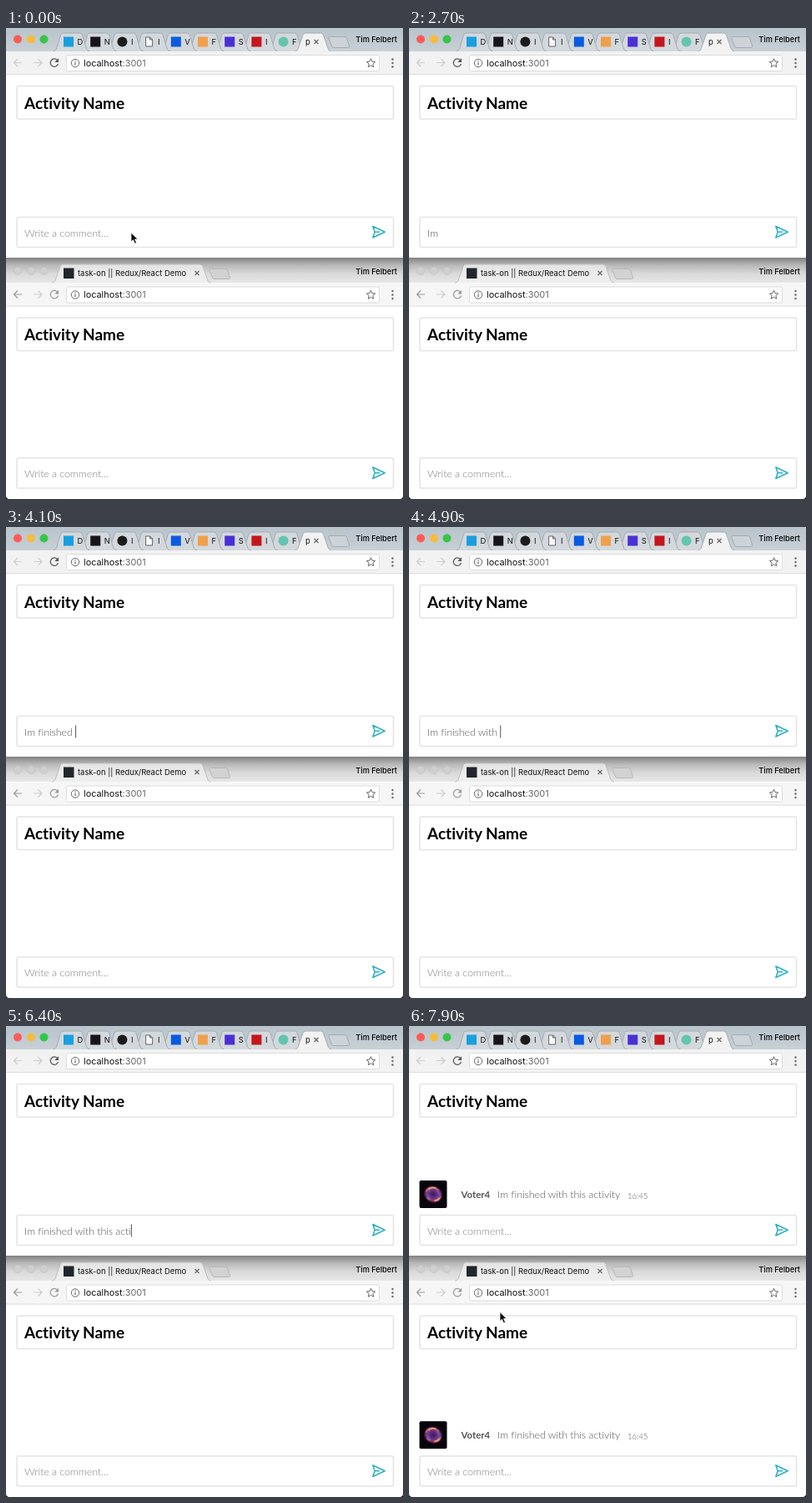
Animation of 476 by 564 pixels, one loop 8000 ms. Source, as an HTML page:

```html
<!DOCTYPE html>
<html lang="en">
<head>
<meta charset="utf-8">
<title>Live comments</title>
<style>
html, body { margin: 0; width: 100%; height: 100%; overflow: hidden; background: #fff; }
svg { display: block; width: 476px; height: 564px; }
text { white-space: pre; }
.ui { font-family: Inter, sans-serif; fill: #111; }
.name { font-size: 9.200px; font-weight: 500; text-anchor: end; fill: #000; }
.lato { font-family: Lato, sans-serif; font-size: 12.600px; font-weight: 300; letter-spacing: -.14px; fill: #555; }
.title { font-size: 19px; font-weight: 700; letter-spacing: 0; font-variant-ligatures: none; fill: #000; }
.user { font-size: 11.400px; font-weight: 700; letter-spacing: 0; fill: #555; }
.time { font-size: 9.500px; letter-spacing: 0; }
.hint { fill: #808080; }
.box { fill: #fff; stroke: #e4e4e4; stroke-width: 1.5; }
.line { fill: none; stroke: #666; stroke-width: 1.2; }
.active { --bar: #f2f2f2; --back: #cdcdcd; --reload: #555; }
.inactive { --bar: #f6f6f6; --back: #999; --reload: #999; }
</style>
</head>
<body>
<svg viewBox="0 0 476 564">
  <defs>
    <linearGradient id="strip" x2="0" y2="1">
      <stop stop-color="#b8c3cb"/><stop offset="1" stop-color="#c8d0d6"/>
    </linearGradient>
    <linearGradient id="shade" x2="0" y2="1">
      <stop stop-color="#828282"/><stop offset=".3" stop-color="#b8b8b8"/>
      <stop offset=".65" stop-color="#dadada"/><stop offset="1" stop-color="#e6e6e6"/>
    </linearGradient>
    <radialGradient id="nebula">
      <stop stop-color="#3d1c4c"/><stop offset=".45" stop-color="#6a3086"/>
      <stop offset=".7" stop-color="#8c3f78"/><stop offset="1" stop-color="#07040c"/>
    </radialGradient>

    <g id="page">
      <path style="fill:var(--bar)" d="M0 28H476V56H0Z"/>
      <path stroke="#dedede" d="M0 55.5H476"/>
      <g class="line">
        <path style="stroke:var(--back)" d="M19 41.5H9.500M14 37l-4.500 4.500 4.500 4.500"/>
        <path stroke="#cdcdcd" d="M33 41.500H43M38.500 37l4.500 4.500-4.500 4.500"/>
        <path style="stroke:var(--reload)" d="M61.500 38.500a4.700 4.700 0 1 0 1 4.500"/>
        <rect x="72.500" y="32.500" width="375" height="19" rx="2" fill="#fff" stroke="#dcdcdc" stroke-width="1"/>
        <circle cx="83" cy="42" r="4.700" stroke-width="1"/>
        <path d="M83 41.300v3.300M83 39v1.200"/>
        <path stroke-width="1" d="M437.500 36.700l1.500 3.400 3.700.4-2.800 2.500.8 3.700-3.200-1.900-3.200 1.900.8-3.700-2.800-2.500 3.700-.4z"/>
      </g>
      <path style="fill:var(--reload)" d="M63 36.300v4.700h-4.700z"/>
      <g fill="#666"><circle cx="463.500" cy="37.500" r="1.200"/><circle cx="463.500" cy="42" r="1.200"/><circle cx="463.500" cy="46.500" r="1.200"/></g>
      <text class="ui" x="93" y="45.700" font-size="10.900">localhost<tspan fill="#666">:3001</tspan></text>
      <rect class="box" x="13" y="69.500" width="451.500" height="39.500" rx="2"/>
      <text class="lato title" x="22" y="96.700">Activity Name</text>
    </g>

    <g id="field">
      <rect class="box" x="13" y="226.500" width="451.500" height="36" rx="2"/>
      <path fill="none" stroke="#2db0c4" stroke-width="1.600" stroke-linejoin="round" d="M439.800 237.500l14.400 6.700-14.400 6.700 2.400-6.700zM442.200 244.200h6"/>
    </g>

    <g id="comment">
      <rect x="12.500" y="185" width="33" height="33" rx="2" fill="#07040c"/>
      <g transform="translate(29 201.500) rotate(25)" fill="none" stroke-width="2">
        <ellipse rx="12" ry="10.500" fill="url(#nebula)"/>
        <ellipse rx="9" ry="7.500" stroke="#d0568c" stroke-dasharray="9 5 4 7"/>
        <ellipse rx="7" ry="6" stroke="#5a58c0" stroke-dasharray="3 8 6 4"/>
        <path stroke="#e59a6a" d="M-8-3q3-5 8-5M5 6q3-2 4-5"/>
      </g>
      <text class="lato user" x="62.500" y="205.700">Voter4</text>
      <text class="lato" x="106" y="206">Im finished with this activity</text>
      <text class="lato time" x="262" y="207">16:45</text>
    </g>

    <text id="hint" class="lato hint" x="22" y="249.500">Write a comment...</text>
  </defs>

  <path fill="url(#strip)" d="M0 0H476V28H0Z"/>
  <circle cx="14" cy="13.500" r="5" fill="#fc5b57"/>
  <circle cx="30" cy="13.500" r="5" fill="#f6bc3c"/>
  <circle cx="45.500" cy="13.500" r="5" fill="#34c648"/>
  <g id="tabs"></g>
  <path fill="#cdd3d7" stroke="#a4acb2" d="M387.500 10.500H406q2 0 2.500 1.500l3 9q.5 2.500-1 2.500H393q-2 0-2.500-1.500l-3.500-9.500q-.5-2 .5-2z"/>
  <path fill="#f2f2f2" stroke="#a4acb2" d="M346 28.500q3-1 4-3l6-17q1-2.500 3-2.500h18.500q2 0 3 2.500l6 17q1 2 4 3"/>
  <text class="ui" x="359" y="20" font-size="9.400">p</text>
  <path class="line" stroke-width="1.100" d="M369.500 14l5 5m0-5l-5 5"/>
  <text class="ui name" x="469" y="17">Tim Felbert</text>
  <use href="#page" class="active"/>
  <use href="#field"/>

  <path fill="url(#shade)" d="M0 275H476V305H0Z"/>
  <path fill="#fff" d="M0 270H476V272q0 3-3 3H3q-3 0-3-3z"/>
  <g fill="#cfcfcf" stroke="#c2c2c2" stroke-width=".6"><circle cx="14" cy="291" r="4.700"/><circle cx="30" cy="291" r="4.700"/><circle cx="45.500" cy="291" r="4.700"/></g>
  <path fill="#f2f2f2" stroke="#bdbdbd" d="M55 305.500q3-1 4-3l6-17q1-2.500 3-2.500h165q2 0 3 2.500l6 17q1 2 4 3" fill-opacity=".75"/>
  <path fill="#d2d2d2" stroke="#b8b8b8" d="M244.500 288.500H263q2 0 2.500 1.500l3 8.500q.5 2-1 2H250q-2 0-2.500-1.500l-3.500-8.500q-.5-2 .5-2z"/>
  <rect x="69" y="287.500" width="12.500" height="12.500" fill="#20262b"/>
  <text class="ui" x="86" y="297" font-size="9.400">task-on || Redux/React Demo</text>
  <path class="line" stroke-width="1.100" d="M226.500 291l5 5m0-5l-5 5"/>
  <text class="ui name" x="469" y="294.500">Tim Felbert</text>
  <use href="#page" y="277.500" class="inactive"/>
  <use href="#field" y="288.500"/>
  <use href="#hint" y="288.500"/>
  <path d="M0 560v4h4q-4 0-4-4zM476 560v4h-4q4 0 4-4z"/>

  <use id="hintTop" href="#hint"/>
  <text id="typed" class="lato" x="22" y="249.500"></text>
  <path id="caret" stroke="#555" d="M0 237.500v15"/>
  <use id="postTop" href="#comment"/>
  <use id="postBottom" href="#comment" y="288.300"/>
  <path id="beam" fill="none" stroke="#222" stroke-width="1.200" d="M147 240.500q3 0 3 2v7q0 2-3 2M153 240.500q-3 0-3 2v7q0 2 3 2M148.500 247.500h3"/>
  <path id="arrow" stroke="#fff" stroke-width=".8" d="M0 0v11l2.500-2.300 2 4.500 2-.9-2-4.300H8z"/>
</svg>
<script>
const $ = id => document.getElementById(id);
const show = (id, on) => $(id).setAttribute('visibility', on ? 'visible' : 'hidden');

// Background tabs: icon colour, round or square, first letter of the title
const tabs = [
  ['#199fe0', 0, 'D'], ['#17151a', 0, 'N'], ['#1b1b1b', 1, 'I'], ['', 0, 'I'], ['#0a5be0', 0, 'V'],
  ['#f0a04b', 0, 'F'], ['#4b2fd6', 0, 'S'], ['#c4161c', 0, 'I'], ['#63c5ae', 1, 'F']
];
$('tabs').innerHTML = tabs.map(([color, round, letter], i) => {
  const icon = !color
    ? '<path fill="#f7f7f7" stroke="#666" d="M14.500 11h5l3 3v8h-8zM19.500 11v3h3"/>'
    : round ? `<circle cx="18.500" cy="16.500" r="6" fill="${color}"/>`
    : `<rect x="12.500" y="10.500" width="12" height="12" fill="${color}"/>`;
  return `<g transform="translate(${56.5 + i * 32.2})">
    <path fill="#d3d8dc" stroke="#a4acb2" d="M0 28q3-1 4-3l5-16.500q1-2.500 3-2.500h20q2 0 3 2.500l5 16.500q1 2 4 3"/>
    ${icon}<svg x="29" style="width:3.500px;height:28px"><text class="ui" y="20" font-size="9.400">${letter}</text></svg></g>`;
}).reverse().join('');

const message = 'Im finished with this activity';
// Key times in tenths of a second
const keys = [16, 18, 21, 30, 31, 32, 35, 36, 36, 37, 38, 40, 43, 44, 46, 47, 49, 51,
  53, 54, 55, 57, 58, 60, 63, 64, 68, 69, 71, 72];
const sent = 7800;

function draw(now) {
  const t = now % 8000;
  const count = t < sent ? keys.filter(k => k * 100 <= t).length : 0;
  const typed = $('typed');
  typed.textContent = message.slice(0, count);
  show('hintTop', !count);

  const x = 22.5 + (count ? typed.getComputedTextLength() : 0);
  $('caret').setAttribute('transform', `translate(${x})`);
  const blinkOff = t >= 800 && t < 1300 || t >= 2700 && t < 3000;
  show('caret', t >= 300 && t < sent && !blinkOff);

  show('beam', t >= 100 && t < 1600);
  show('postTop', t >= sent);
  show('postBottom', t >= sent + 100);
  show('arrow', t < 100 || t >= sent + 100);
  $('arrow').setAttribute('transform', t < 100 ? 'translate(150 245)' : 'translate(109 342.500)');
  requestAnimationFrame(draw);
}
requestAnimationFrame(draw);
</script>
</body>
</html>
```
